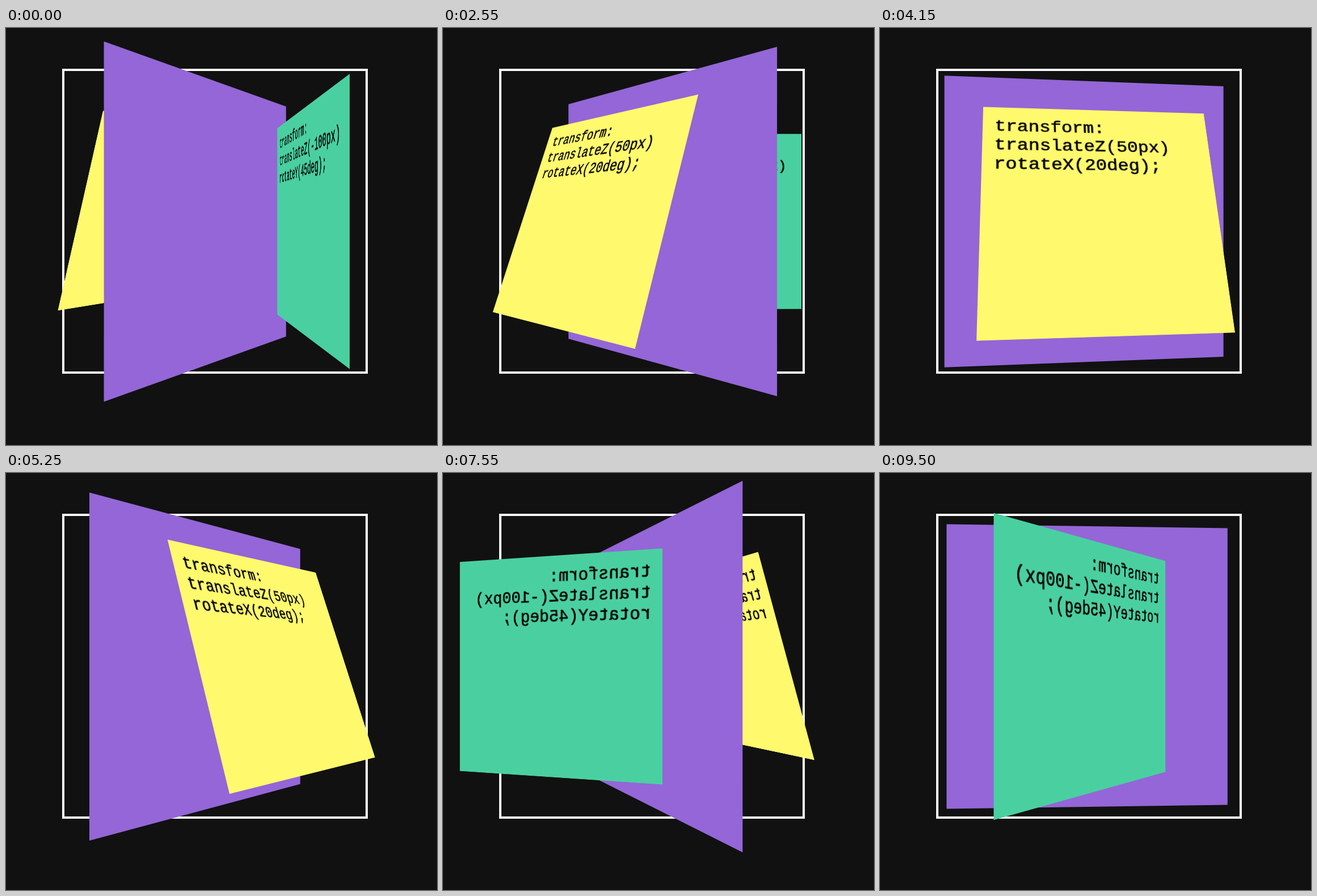
An HTML page that plays this animation: 760 px wide and 737 px high, repeating every 9550 ms.

```html
<!DOCTYPE html>
<html lang="en">
<head>
<meta charset="utf-8">
<title>Rotating 3D panels</title>
<style>
  html, body { margin: 0; height: 100%; overflow: hidden; background: #111; }

  /* 1em = one unit of the 300-unit layout */
  .frame {
    position: absolute;
    left: 99.4px;
    top: 72.4px;
    width: 300em;
    height: 300em;
    border: 4px solid #fff;
    font-size: 1.77px;
    perspective: 500em;
  }
  .scene, .panel { position: absolute; box-sizing: border-box; }
  .scene {
    inset: 10em;
    background: #9466d7;
    transform-style: preserve-3d;
  }
  .panel {
    left: 40em;
    top: 40em;
    width: 200em;
    height: 200em;
    padding: 10em;
  }
  .green { background: #4ad0a0; transform: translateZ(-100em) rotateY(45deg); }
  .yellow {
    background: #fff96e;
    transform-origin: top;
    transform: translateZ(50em) rotateX(20deg);
  }
  pre {
    margin: 0;
    color: #000;
    font: 16em/1.13 "Courier New", "Liberation Mono", monospace;
    -webkit-text-stroke: .02em #000;
  }
</style>
</head>
<body>
<div class="frame">
  <div class="scene" id="scene">
    <div class="panel green"><pre>transform:
translateZ(-100px)
rotateY(45deg);</pre></div>
    <div class="panel yellow"><pre>transform:
translateZ(50px)
rotateX(20deg);</pre></div>
  </div>
</div>
<script>
  const LOOP = 9550, STEP = 50, START = 232, TURN = 11000;
  const scene = document.getElementById('scene');

  function draw() {
    const time = Math.floor(performance.now() % LOOP / STEP) * STEP;
    scene.style.transform = `rotateY(${START + 360 * time / TURN}deg)`;
    requestAnimationFrame(draw);
  }
  draw();
</script>
</body>
</html>
```
